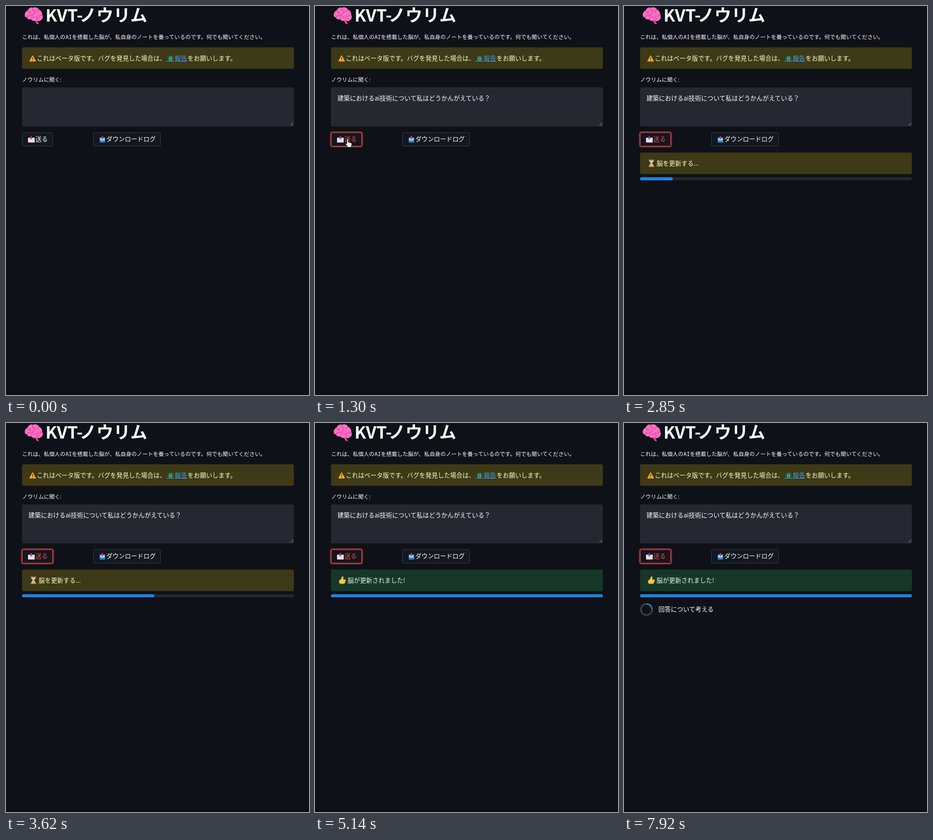
An HTML page for the animation above (7990 ms loop, 660 px wide and 848 px high).

```html
<!DOCTYPE html>
<html lang="ja">
<head>
<meta charset="utf-8">
<style>
  html, body { margin: 0; height: 100%; overflow: hidden; background: #0e1117; }
  svg { display: block; font: 500 13.46px "Noto Sans CJK JP", "Noto Sans CJK", sans-serif; fill: #fff; }
  .title { font-size: 36.96px; font-weight: 700; }
  .small { font-size: 11.8px; }
  .mono { font-family: "Noto Sans Mono", "Noto Sans CJK JP", "Noto Sans CJK", monospace; }
  .warn { fill: #ffffc2; }
  .button { fill: #131720; stroke: #3d4046; }
</style>
</head>
<body>
<svg width="660" height="848" viewBox="0 0 660 848">
  <defs>
    <path id="arrow-down" d="M6.2 0h2.600v4h2.200L7.500 7.800 4 4h2.200z" fill="#e0326f"/>
  </defs>
  <rect y="846" width="660" height="2" fill="#0a0c11"/>

  <!-- header -->
  <g transform="translate(40 2)">
    <path d="M27 28l5 10-5-1-6-10z" fill="#d8479c"/>
    <path d="M1 19C0 13 4 9 7 8 9 2 15 0 19 2c5-3 11 0 13 4 5 2 7 7 7 11 2 5 1 10-3 12-3 3-8 2-10 0-5 3-10 1-11-2-5 1-9-1-9-4-3 0-5-2-5-4z" fill="#ff6fc4"/>
    <path d="M7 9c2 3 5 3 7 1M19 2c-3 3-1 6 2 6 4 0 3 5 0 6M32 7c-4 0-5 3-4 5M6 23c0-4 4-5 7-4 4 1 7-1 7-5M15 26c1-4 6-5 9-3 4 1 6-2 5-5M39 18c-3-1-5 1-6 3M10 14c2-1 4 0 5 1M26 29c1-3 4-4 7-3" fill="none" stroke="#cf429b" stroke-width="1.3" stroke-linecap="round"/>
  </g>
  <text class="title" x="86" y="34">KVT-</text>
  <text class="title" x="160" y="34">ノウリム</text>
  <text class="small mono" x="35" y="72">これは、私個人のAIを搭載した脳が、私自身のノートを養っているのです。何でも聞いてください。</text>

  <!-- beta notice -->
  <rect x="35" y="90" width="592" height="47" rx="3.4" fill="#3e3916"/>
  <path d="M58 108.5l6.3 11.7H51.7z" fill="#f9a825" stroke="#f9a825" stroke-width="1.6" stroke-linejoin="round"/>
  <path d="M58 111.5v4.5M58 117.6v1.6" stroke="#4a3413" stroke-width="1.6"/>
  <text class="warn" x="67" y="119">これはベータ版です。バグを発見した場合は、</text>
  <g stroke="#2b8f7b" fill="#2ba58b">
    <path d="M352 110l3 2M365 110l-3 2M351.500 115h14M352 120l3-2M365 120l-3-2M356 107.500l1 2M361 107.500l-1 2" fill="none"/>
    <ellipse cx="358.500" cy="115" rx="4" ry="5.500" stroke="none"/>
    <path d="M358.500 111v9" stroke="#17584f"/>
  </g>
  <text x="367.500" y="119" fill="#3d9df3">報告</text>
  <path d="M349 120.500h46" stroke="#3d9df3"/>
  <text class="warn" x="395.500" y="119">をお願いします。</text>

  <!-- question form -->
  <text class="small" x="35" y="165">ノウリムに聞く:</text>
  <rect x="35" y="177.500" width="592" height="85" rx="3.4" fill="#262730"/>
  <rect id="focus" x="35.500" y="178" width="591" height="84" rx="3.4" fill="none" stroke="#ff4b4b"/>
  <path d="M619.500 260.500l6-6M623.500 260.500l2-2" stroke="#a0a1a6"/>
  <text id="question" x="49" y="206.300">建築におけるai技術について私はどうかんがえている？</text>

  <rect id="ring" x="33.900" y="274.700" width="69.300" height="32.300" rx="4" fill="none" stroke="#ff4b4b" stroke-opacity=".5" stroke-width="2.700"/>
  <rect id="send" class="button" x="35.500" y="276" width="66" height="29.500" rx="3"/>
  <g transform="translate(47.500 283.500)">
    <path d="M.5 3.500h14.500v10.500H.5z" fill="#ece9f3"/>
    <path d="M.5 4l7.300 6L15 4M.5 14l5.300-5M15 14l-5.300-5" fill="none" stroke="#bdb4d2" stroke-width=".8"/>
    <use href="#arrow-down"/>
  </g>
  <text id="send-label" x="64" y="295">送る</text>
  <rect class="button" x="190.500" y="276" width="146" height="29.500" rx="3"/>
  <g transform="translate(202.500 283.500)">
    <rect x="1.500" y="3" width="12" height="11" rx="1.500" fill="#2b9be0"/>
    <path d="M3 4.500h9v5H3z" fill="#b9dcf0"/>
    <path d="M1.500 9.500h3.500l1 1.500h3l1-1.500h3.500v3q0 1.500-1.500 1.500H3q-1.500 0-1.500-1.500z" fill="#1b8ad6"/>
    <use href="#arrow-down"/>
  </g>
  <text x="218.500" y="295">ダウンロードログ</text>

  <!-- progress -->
  <g id="status">
    <rect id="message" x="35" y="319.500" width="592" height="47" rx="3.4"/>
    <g id="updating">
      <path d="M55 337c0 4 3 4 3 6s-3 2-3 6h9.500c0-4-3-4-3-6s3-2 3-6z" fill="#a9cfe3"/>
      <path d="M56 339.500h7.500l-3.200 3.500.2 2.500 3 3.500h-7.500l3-3.500z" fill="#f4b83f"/>
      <path d="M53.500 336h12.500M53.500 350h12.500" stroke="#b98a55" stroke-width="2"/>
      <text class="warn" x="71" y="348">脳を更新する...</text>
    </g>
    <g id="updated">
      <path d="M52.500 343l3-1 3.500-7c2-1.500 3.500 0 3 2l-.800 4h4c2 0 2 2 1 2.600 1 .6.800 2-.4 2.400.6 1 0 2-1 2.200.3 1-.4 2.300-1.800 2.300H56l-3.500-1.500z" fill="#ffc83d"/>
      <path d="M61.500 343.600h5M61.500 346h4.600M61.500 348.300h4" stroke="#d99a25" stroke-width=".8"/>
      <text x="71" y="348" fill="#dffde9">脳が更新されました!</text>
    </g>
    <rect x="35" y="373.300" width="592" height="6.700" rx="3.350" fill="#262730"/>
    <rect id="bar" x="35" y="373.300" height="6.700" rx="3.350" fill="#1c83e1"/>
  </g>

  <!-- waiting for the answer -->
  <g id="thinking">
    <g fill="none" stroke-width="3.300">
      <circle cx="49" cy="406.500" r="12.100" stroke="#3d4046"/>
      <path id="arc" d="M40.440 397.940A12.100 12.100 0 0 1 57.560 397.940" stroke="#2472b8"/>
    </g>
    <text x="75" y="411.300">回答について考える</text>
  </g>

  <!-- pointer shapes, hot spot at 0,0 -->
  <g id="pointer" stroke-linejoin="round">
    <path id="arrow" d="M0 0v15l3.500-3 2.300 5.500 2.500-1L6 11h4.800z" fill="#fff" stroke="#111"/>
    <path id="beam" d="M-3-8h6M0-8V8M-3 8h6" stroke="#fff"/>
    <path id="hand" d="M-1.500 1c0-2 3-2 3 0v5l6 1.500c1.500.5 2 1.500 1.700 3L8 17H1l-5-6.500c-1-1.500.8-2.800 2-1.500l.5.700z" fill="#fff" stroke="#111"/>
  </g>
</svg>
<script>
const LOOP = 7990;
const FOCUS = 470, PASTE = 680, HOVER = 1080, CLICK = 1230, START = 1440, DONE = 4930, THINK = 6730;
const $ = id => document.getElementById(id);
const set = (id, attrs) => { for (const k in attrs) $(id).setAttribute(k, attrs[k]); };
const show = (id, on) => set(id, { opacity: +on });
const ramp = (t, from, length) => Math.min(1, Math.max(0, (t - from) / length));

// Linear interpolation through [time, value] points.
function follow(points, t) {
  let value = points[0][1];
  for (let i = 1; i < points.length; i++) {
    const [t0, v0] = points[i - 1], [t1, v1] = points[i];
    if (t >= t0) value = v0 + (v1 - v0) * ramp(t, t0, t1 - t0);
  }
  return value;
}

const progress = [[2200, 0], [2520, 16], [2850, 71], [2990, 110], [3830, 347], [4370, 442], [4650, 504], [5070, 592]];
const pointerX = [[120, 380], [470, 270], [700, 260], [1120, 72], [1300, 71], [1510, 44], [1640, -12]];
const pointerY = [[120, 686], [470, 215], [700, 212], [1120, 292], [1300, 291], [1510, 294], [1640, 295]];

function draw(t) {
  show('question', t >= PASTE);
  show('focus', t < FOCUS ? 0 : 1 - ramp(t, CLICK, 80));

  const hot = t >= HOVER;
  set('send', { style: hot ? 'stroke:#ff4b4b' : '' });
  set('send-label', { fill: hot ? '#f04f45' : '#fff' });
  show('ring', t >= CLICK);

  const done = t >= DONE;
  show('status', t < START ? 0 : 0.7 + 0.3 * ramp(t, START, 150));
  set('message', { fill: done ? '#173828' : '#3e3916' });
  show('updating', !done);
  show('updated', done);
  set('bar', { width: follow(progress, t) });

  show('thinking', ramp(t, THINK - 40, 200));
  set('arc', { transform: `rotate(${45 + (t - 7920) * 0.36} 49 406.5)` });

  const x = follow(pointerX, t), y = follow(pointerY, t);
  const inField = y > 178 && y < 262 && x > 35;
  set('pointer', { transform: `translate(${x} ${y})` });
  show('pointer', t >= 120 && t < 1640);
  show('hand', hot);
  show('beam', !hot && inField);
  show('arrow', !hot && !inField);
}

function tick() {
  draw(performance.now() % LOOP);
  requestAnimationFrame(tick);
}
tick();
</script>
</body>
</html>
```
